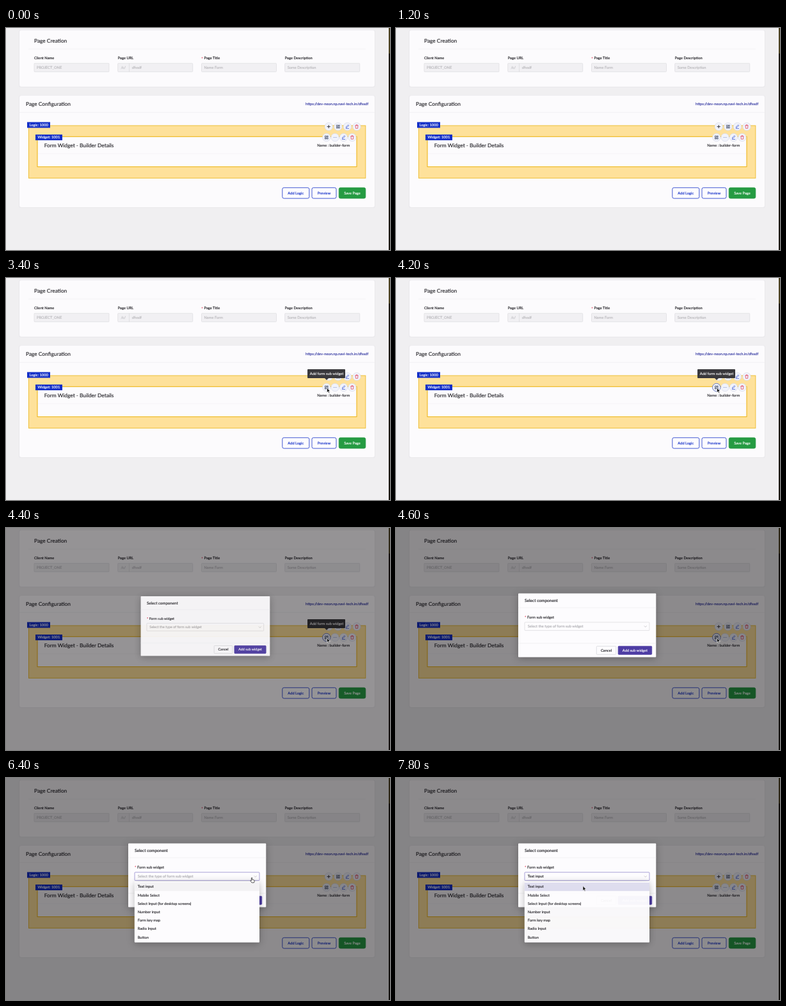
Write an HTML page that moves like this. It is 600 px wide and 348 px high and loops after 8000 ms.

```html
<!DOCTYPE html>
<html lang="en">
<head>
<meta charset="utf-8">
<title>Page builder</title>
<style>
  html, body { margin: 0; width: 100%; height: 100%; overflow: hidden; background: #f0eff1; }
  svg { display: block; width: 100vw; height: 100vh; }
  text { font-family: Lato, sans-serif; font-size: 5.75px; stroke-width: .12px; text-rendering: geometricPrecision; white-space: pre; }
  .heading { font-size: 8.35px; }
  .title { font-size: 6.55px; }
  .medium { font-weight: 500; }
  .bold { font-weight: 700; }
  .raised { filter: drop-shadow(0 2px 6px rgba(0, 0, 0, .28)); }
</style>
</head>
<body>
<svg id="stage" viewBox="0 0 600 348"></svg>
<script>
const INK = '#222126', BLUE = '#1430c8', RED = '#e0304e', PURPLE = '#4e3da4', GREY = '#b5b4b8', LINE = '#d9d8dc';

const attrs = o => Object.entries(o).map(([k, v]) => ` ${k}="${v}"`).join('');
const box = (x, y, w, h, fill, more = {}) => `<rect${attrs({ x, y, width: w, height: h, fill, ...more })}/>`;
const label = (x, y, text, color = INK, style = '', more = {}) =>
  `<text${attrs({ x, y, fill: color, stroke: color, class: style, ...more })}>${text}</text>`;
const path = (d, stroke, more = {}) => `<path${attrs({ d, stroke, fill: 'none', 'stroke-width': .7, ...more })}/>`;
const group = (content, more = {}) => `<g${attrs(more)}>${content}</g>`;
const outline = (stroke, rx = 1, width = .6) => ({ stroke, rx, 'stroke-width': width });

function button(x, y, w, h, text, fill, stroke, color, rx = 1) {
  return box(x, y, w, h, fill, outline(stroke, rx, .8)) +
    label(x + w / 2, y + h / 2 + 2, text, color, 'medium', { 'text-anchor': 'middle' });
}

function field(x, title, value, indent = 4) {
  return label(x, 49.3, title, INK, 'medium') + box(x, 55.3, 117, 13.4, '#f1f0f3', outline(LINE)) +
    label(x + indent, 64, value, GREY);
}

const tag = (x, y, w, text) => box(x, y, w, 9, BLUE) + label(x + 3.4, y + 6.3, text, '#fff', 'medium');

const icons = {
  plus: path('M-2.6 0H2.6M0-2.6V2.6', INK, { 'stroke-width': .9 }),
  grid: path('M-2.4-2.4H-.4V-.2H-2.4ZM.7-2.4H2.5V-.8H.7ZM-2.4 1H-.4V2.5H-2.4ZM.7.4H2.5V2.5H.7Z', '#33405f'),
  dots: [-2, 0, 2].map(x => `<circle cx="${x}" r=".5" fill="#5f76b8"/>`).join(''),
  pencil: path('M-2.2 1.7L-1.8.2 1.2-2.8 2.3-1.7-.7 1.3ZM-2.6 3H2.6', '#2d4bd0'),
  trash: path('M-2.5-1.7H2.5M-1-1.7V-2.7H1V-1.7M-1.9-1.6L-1.6 2.7H1.6L1.9-1.6', RED)
};
const tool = (x, y, icon) => group(`<circle r="6.2" fill="#f1f3fb" stroke="#d3d7e4" stroke-width=".6"/>${icons[icon]}`,
  { transform: `translate(${x} ${y})` });

const cards = box(20, 3, 557, 90, '#e9e8eb', { rx: 3 }) + box(21, 3.5, 555, 88.5, '#fcfbfd', { rx: 3 }) +
  box(20, 105.5, 557, 176.5, '#e9e8eb', { rx: 3 }) + box(21, 106, 555, 175, '#fcfbfd', { rx: 3 }) +
  path('M35 33H562M21 132.3H576', '#efeef1');

const creation = label(44, 23, 'Page Creation', INK, 'heading') +
  field(44, 'Client Name', 'PROJECT_ONE') +
  field(174.7, 'Page URL', 'dfssdf', 22) + path('M192.5 55.3V68.7', LINE) + label(179.5, 64, '/c/', GREY) +
  label(305.3, 49.5, '*', RED) + field(305.5, '<tspan dx="4">Page Title</tspan>', 'Name Form') +
  field(435.7, 'Page Description', 'Some Description');

const configuration = label(31, 121.7, 'Page Configuration', INK, 'heading') +
  label(468, 121, 'https://dev-neon.np.navi-tech.in/dfssdf', '#2a2f9e') +
  box(35.5, 153, 526.3, 82.3, '#fee19a', outline('#eebf38', 0, 1)) +
  box(49, 170.3, 499, 47.2, '#fcfbfd', outline('#eeb71c', 0, 1.1)) +
  path('M50 197H547', '#f1f0f2', { 'stroke-width': .6 }) +
  label(59.7, 187.3, 'Form Widget - Builder Details', INK, 'heading') +
  label(486.3, 186.3, 'Name : builder-form') +
  tag(33, 147.5, 36, 'Logic: 1000') + tag(46, 167, 42, 'Widget: 1001') +
  ['plus', 'grid', 'pencil', 'trash'].map((name, i) => tool(504.2 + i * 14.6, 154.6, name)).join('') +
  ['grid', 'dots', 'pencil', 'trash'].map((name, i) => tool(500.7 + i * 13.4, 171.5, name)).join('') +
  button(431.8, 250.3, 42, 16.8, 'Add Logic', '#fdfcff', BLUE, BLUE, 2.5) +
  button(478, 250.3, 38, 16.8, 'Preview', '#fdfcff', BLUE, BLUE, 2.5) +
  button(520.2, 250.3, 41.6, 16.8, 'Save Page', '#259b42', '#259b42', '#fff', 2.5);

const tooltip = box(471, 143, 59, 14, '#39383c', { rx: 1 }) +
  '<path d="M498 157H504L501 160Z" fill="#39383c"/>' + label(474.8, 152, 'Add form sub widget', '#fff');

const modal = box(191, 102.5, 215.3, 100, '#fdfcfe', { rx: 1, class: 'raised' }) +
  path('M191 125H406.3M191 180.7H406.3', '#eeedf0') +
  label(201, 116.2, 'Select component', INK, 'title medium') +
  label(201, 142.3, '*', RED) + label(205, 141.8, 'Form sub widget') +
  box(201, 147.8, 195, 12.8, '#fdfcfe', { id: 'select', rx: 1, 'stroke-width': .7 }) +
  label(205.7, 156.3, '', INK, '', { id: 'value' }) + path('M387.7 153.3L389.7 155.3 391.7 153.3', GREY) +
  button(313.3, 185.3, 30.5, 13, 'Cancel', '#fdfcfe', LINE, INK) +
  button(347.2, 185.3, 52.5, 13, 'Add sub widget', PURPLE, PURPLE, '#fff');

const options = ['Text input', 'Mobile Select', 'Select Input (for desktop screens)', 'Number input',
  'Form key map', 'Radio Input', 'Button'];
const dropdown = box(200.8, 162.6, 195.2, 95.2, '#fdfcfe', { rx: 1, class: 'raised' }) +
  box(200.8, 164, 195.2, 13.2, '#f3f2f4', { id: 'hover' }) +
  options.map((text, i) => label(205.7, 172.3 + i * 13.22, text)).join('');

const arrow = '<path d="M0 0V7.2L1.7 5.7 2.8 8.2 4 7.6 2.9 5.2H5Z" fill="#111" stroke="#fff" stroke-width=".6"/>';
const hand = '<path d="M-.8-.4Q0-1.2.6-.4V2.4L3.6 3.1Q4.3 3.4 4 4.6L3.3 7H-.2L-2.4 4.3Q-2.3 3.2-.8 4Z" fill="#fff" stroke="#111" stroke-width=".7"/>';

const hidden = { display: 'none' };
document.getElementById('stage').innerHTML =
  box(0, 0, 600, 348, '#f0eff1') + cards + creation + configuration +
  '<circle id="focus" cx="500.7" cy="171.5" r="6.2" fill="none" stroke="#5468b8" stroke-width=".8"/>' +
  group(tooltip, { id: 'tooltip', ...hidden }) +
  box(598, 0, 2, 348, '#1b1712') + box(598, 0, 2, 40, '#4a4020') +
  box(0, 0, 600, 348, '#040004', { id: 'mask' }) +
  group(modal, { id: 'modal', ...hidden }) + group(dropdown, { id: 'dropdown', ...hidden }) +
  group(group(arrow, { id: 'arrow' }) + group(hand, { id: 'hand' }), { id: 'cursor', ...hidden });

const el = id => document.getElementById(id);
const set = (id, values) => Object.entries(values).forEach(([k, v]) => el(id).setAttribute(k, v));
const show = (id, on) => set(id, { display: on ? 'inline' : 'none' });
const clamp = v => Math.min(1, Math.max(0, v));

// Pointer stops: time, x, y
const stops = [[2000, 548, 160], [2400, 501.5, 172.3], [4600, 501.5, 172.3], [5400, 384.2, 157],
  [6400, 384.2, 157], [7000, 293, 170.3], [7400, 292, 169.3], [8000, 292, 169.3]];

function pointer(t) {
  const i = Math.max(1, stops.findIndex(s => s[0] > t));
  const [t0, x0, y0] = stops[i - 1], [t1, x1, y1] = stops[i];
  const p = clamp((t - t0) / (t1 - t0)), e = p * p * (3 - 2 * p);
  return [x0 + (x1 - x0) * e, y0 + (y1 - y0) * e];
}

function draw(t) {
  const open = 1 - (1 - clamp((t - 4200) / 350)) ** 3;
  const scale = .2 + .8 * open;
  const chosen = t >= 7800, active = t >= 6000;

  show('focus', t >= 4200 && t < 6000);
  show('tooltip', t >= 2600 && t < 4600);
  set('mask', { opacity: .45 * open });
  show('modal', open > 0);
  set('modal', { transform: `translate(502 172) scale(${scale}) translate(-502 -172)`, opacity: open });

  const valueColor = chosen ? INK : '#aaa9ae';
  set('select', { stroke: active ? '#857ac8' : LINE });
  set('value', { fill: valueColor, stroke: valueColor });
  el('value').textContent = chosen ? options[0] : 'Select the type of form sub widget';
  show('dropdown', active);
  set('dropdown', { opacity: chosen ? .97 : 1 });
  set('hover', { fill: chosen ? '#dedcee' : '#f3f2f4' });

  const overSelect = t >= 5400 && t <= 6400;
  show('cursor', t >= 2000);
  show('hand', overSelect);
  show('arrow', !overSelect);
  set('cursor', { transform: `translate(${pointer(t)})` });
}

const start = performance.now();
function tick() {
  const t = (performance.now() - start) % 8000;
  draw(Math.floor(t / 200) * 200);
  requestAnimationFrame(tick);
}
tick();
</script>
</body>
</html>
```
